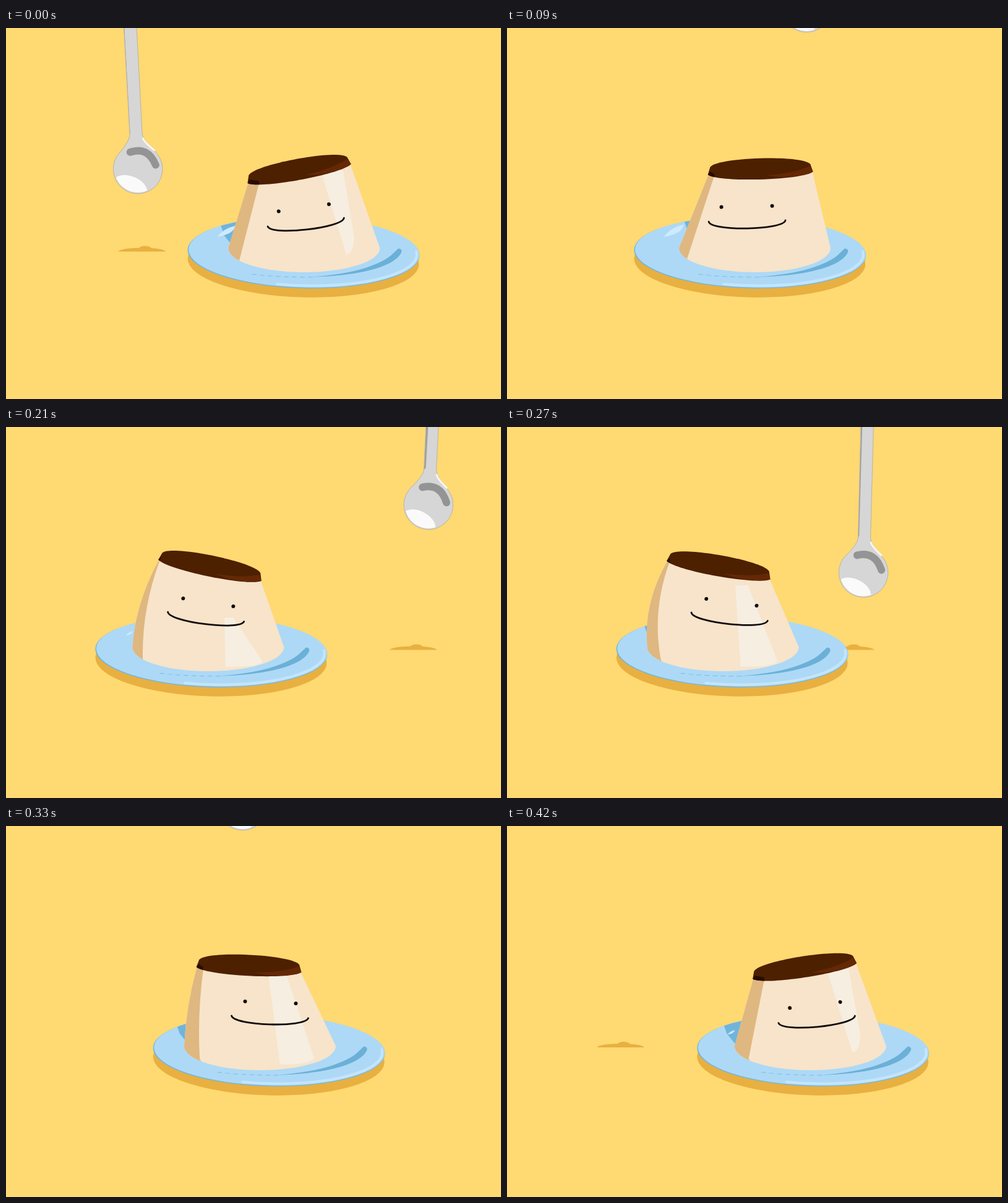
Write an HTML page with a canvas that moves like this. It is 800 px wide and 600 px high and loops after 450 ms.

```html
<!DOCTYPE html>
<html lang="en">
<head>
<meta charset="utf-8">
<title>Pudding and spoon</title>
<style>
  html, body { margin: 0; width: 100%; height: 100%; overflow: hidden; background: #ffd972; }
  canvas { display: block; }
</style>
</head>
<body>
<canvas id="stage" width="800" height="600"></canvas>
<script>
const ctx = document.getElementById('stage').getContext('2d');
const RAD = Math.PI / 180;
// The swing takes 16 beats; the loop jumps back after 15.
const BEAT = 30, BEATS = 15, CYCLE = 16;
const clamp = v => Math.min(1, Math.max(0, v));

function poseAt(beat) {
  const phase = 33.75 * RAD + beat * 2 * Math.PI / CYCLE;
  const cos = Math.cos(phase), sin = Math.sin(phase);
  const cos2 = Math.cos(2 * phase), sin2 = Math.sin(2 * phase);

  const plate = 411 + 83 * cos + 2.3 * cos2;
  const base = plate - 3.3 - 0.5 * cos + 11.3 * sin + cos2 - 2.2 * sin2;
  const topTilt = 0.6 - 10.4 * cos - 4.4 * sin;
  const bounce = (beat + 3.4) % (CYCLE / 2) - 3.98;

  return {
    beat, plate, base, topTilt,
    topX: plate - 6.6 - 11.3 * cos + 21.1 * sin + 3.3 * cos2 - 5 * sin2 + 2.8 * Math.cos(3 * phase),
    topY: 226.5 + 1.5 * cos + 1.5 * sin,
    bulge: -6 * Math.max(0, -cos - sin) ** 2,
    shadeTop: 11 + 8 * cos + 1.5 * sin,
    shadeBase: 18.6 + 3 * cos - 6 * sin,
    faceX: plate - 1.4 + 4.2 * cos - 3 * sin,
    faceY: 287 + 3 * cos + 2.3 * sin,
    faceTilt: 0.77 * topTilt,
    plateShade: -131.5 - 14.5 * cos + 21 * sin - 5 * sin2,
    glint: clamp(0.5 + 0.7 * sin),
    spoonX: 430.5 - 260 * cos - 3 * cos2,
    spoonY: 244 - 47.3 * bounce ** 2,
    shadowX: 421 - 242 * cos,
    shadowY: 358 + 3.5 * Math.cos(beat * 4 * Math.PI / CYCLE)
  };
}

function fill(color, draw) {
  ctx.fillStyle = color;
  ctx.beginPath();
  draw();
  ctx.fill();
}

function stroke(color, width, draw) {
  ctx.strokeStyle = color;
  ctx.lineWidth = width;
  ctx.lineCap = 'round';
  ctx.beginPath();
  draw();
  ctx.stroke();
}

const ellipse = (x, y, rx, ry, from = 0, to = 2 * Math.PI, back = false) =>
  ctx.ellipse(x, y, rx, ry, 0, from, to, back);

function polygon(points) {
  points.forEach(([x, y]) => ctx.lineTo(x, y));
  ctx.closePath();
}

function arch(from, control, to) {
  ctx.moveTo(...from);
  ctx.quadraticCurveTo(...control, ...to);
}

function placed(x, y, degrees, draw) {
  ctx.save();
  ctx.translate(x, y);
  ctx.rotate(degrees * RAD);
  draw();
  ctx.restore();
}

function drawSpoonShadow(p) {
  placed(p.shadowX, p.shadowY, 0, () => {
    fill('#e8b040', () => ellipse(0, 0, 38, 6, Math.PI, 0));
    fill('#e8b040', () => ellipse(5, -5, 10, 4));
  });
}

function spoonOutline() {
  ctx.moveTo(-10.5, -420);
  ctx.lineTo(-10, -56);
  ctx.quadraticCurveTo(-11, -46, -28, -28);
  ctx.arc(0, 0, 39.8, 226 * RAD, -46 * RAD, true);
  ctx.quadraticCurveTo(11, -46, 10, -56);
  ctx.lineTo(10.5, -420);
  ctx.closePath();
}

function drawSpoon(p) {
  placed(p.spoonX, p.spoonY, (p.spoonX - 460) * 0.0125, () => {
    const edge = Math.max(1, (p.spoonX - 450) * 0.025);
    fill('#d6d6d6', spoonOutline);
    fill('#a0a0a0', () => polygon([[-10.5, -420], [-10.5 + edge, -420], [-10 + edge / 2, -60], [-10, -56]]));
    stroke('#b5b0a5', 0.9, spoonOutline);
    stroke('#f6f6f6', 3, () => arch([11, -49], [13, -42], [28, -29]));
    stroke('#949494', 12, () => arch([-11, -28], [18, -36], [29, -5]));
    ctx.beginPath();
    ellipse(0, 0, 38, 38);
    ctx.clip();
    fill('#fafafa', () => ctx.ellipse(-14, 29, 29, 18, 0.45, 0, 2 * Math.PI));
  });
}

function drawPlate(p) {
  placed(p.plate, 363.5, 1.5, () => {
    fill('#e8b040', () => ellipse(0, 14, 187, 58));
    fill('#70b6df', () => ellipse(0, 0, 187.5, 57.5));
    ctx.beginPath();
    ellipse(0.6, -0.9, 186.6, 57);
    ctx.clip();
    fill('#add9f6', () => ctx.rect(-190, -60, 380, 120));

    const shade = p.plateShade;
    fill('#70b4dc', () => polygon([[shade - 5, -58], [shade + 8, -24], [shade + 25, -4], [-90, -4], [-90, -58]]));
    placed(-138, -23, 0, () => {
      ctx.scale(p.glint, p.glint);
      fill('#cdeaff', () => {
        arch([-2, 1], [8, -14], [30, -20]);
        ctx.quadraticCurveTo(28, -5, -2, 1);
      });
    });

    stroke('#c4e5fc', 4, () => ellipse(0, -1.5, 183, 54.5, -0.1, 1.8));
    fill('#6bb0d7', () => {
      arch([153, -11], [162, -10], [156, -1]);
      ctx.bezierCurveTo(140, 24, 70, 37, 10, 39);
      ctx.bezierCurveTo(75, 34, 128, 17, 146, -4);
      ctx.closePath();
    });
    ctx.setLineDash([7, 6]);
    stroke('#7dbde2', 1, () => arch([-82, 37], [-35, 41], [20, 39]));
  });
}

// A strip of light that climbs the front and then turns to the right side.
function drawGloss(p) {
  const age = (p.beat < 2 ? p.beat + CYCLE : p.beat) - 7;
  if (age < 0) return;
  const turn = clamp(age / 7), settle = turn ** 4;
  const top = 230 + 78 * (1 - clamp(age / 3));
  const right = p.base + 88 - 7 * settle, bottom = 388 - 22 * settle;
  fill('#f6eee1', () => {
    ctx.moveTo(p.topX + 22 + 14 * turn, top);
    ctx.lineTo(p.topX + 36 + 36 * turn, top);
    ctx.lineTo(right, 379 - 40 * settle);
    ctx.quadraticCurveTo(right - 2, bottom, p.base + 28 + 40 * settle, bottom);
    ctx.closePath();
  });
}

function drawBody(p) {
  const angle = p.topTilt * RAD, cos = Math.cos(angle), sin = Math.sin(angle);
  const corner = x => [p.topX + x * cos - 7 * sin, p.topY + x * sin + 7 * cos];
  const left = corner(-84), right = corner(84);
  const baseLeft = p.base - 122.5;
  const side = (from, to) =>
    ctx.quadraticCurveTo((from[0] + to[0]) / 2 + 2 * p.bulge, (from[1] + to[1]) / 2, ...to);

  ctx.save();
  ctx.beginPath();
  ctx.moveTo(...left);
  side(left, [baseLeft, 356]);
  ellipse(p.base, 356, 122.5, 39, Math.PI, 0, true);
  ctx.lineTo(...right);
  ctx.closePath();
  ctx.fillStyle = '#f7e4ca';
  ctx.fill();
  ctx.clip();

  fill('#dfb780', () => {
    const top = [left[0] + p.shadeTop, left[1] - 3];
    const foot = [baseLeft + p.shadeBase, 376];
    ctx.moveTo(...top);
    side(top, foot);
    ctx.lineTo(foot[0] + 12, 400);
    ctx.lineTo(baseLeft - 20, 400);
    ctx.lineTo(baseLeft - 20, top[1]);
    ctx.closePath();
  });
  drawGloss(p);
  ctx.restore();
}

function drawCaramel(p) {
  placed(p.topX, p.topY, p.topTilt, () => {
    ctx.beginPath();
    ctx.moveTo(-85, 7);
    ctx.lineTo(-81, -5);
    ctx.bezierCurveTo(-70, -21, 70, -21, 81, -5);
    ctx.lineTo(85, 7);
    ctx.bezierCurveTo(68, 20.5, -68, 20.5, -85, 7);
    ctx.closePath();
    ctx.fillStyle = '#4d2000';
    ctx.fill();
    ctx.clip();
    fill('#652804', () => {
      arch([8, 11], [55, 9], [80, -2]);
      ctx.lineTo(86, 8);
      ctx.quadraticCurveTo(60, 16, 30, 14);
    });
    const inner = p.shadeTop - 85;
    fill('#260d00', () => polygon([[-86, 8], [-81, 2], [inner, 7], [inner, 15]]));
  });
}

function drawFace(p) {
  placed(p.faceX, p.faceY, p.faceTilt, () => {
    [-41, 41].forEach(x => fill('#120d0b', () => ellipse(x, 0, 3, 3)));
    ctx.translate(0, 23.5);
    ctx.rotate(-0.2 * p.faceTilt * RAD);
    stroke('#120d0b', 2.8, () => {
      ctx.moveTo(-62, 0);
      ctx.bezierCurveTo(-58, 16, 58, 16, 62, 0);
    });
  });
}

function render(beat) {
  const pose = poseAt(beat);
  ctx.fillStyle = '#ffd972';
  ctx.fillRect(0, 0, 800, 600);
  [drawSpoonShadow, drawSpoon, drawPlate, drawBody, drawCaramel, drawFace].forEach(draw => draw(pose));
}

const start = performance.now();
function tick() {
  render(Math.floor((performance.now() - start) / BEAT) % BEATS);
  requestAnimationFrame(tick);
}
tick();
</script>
</body>
</html>
```
